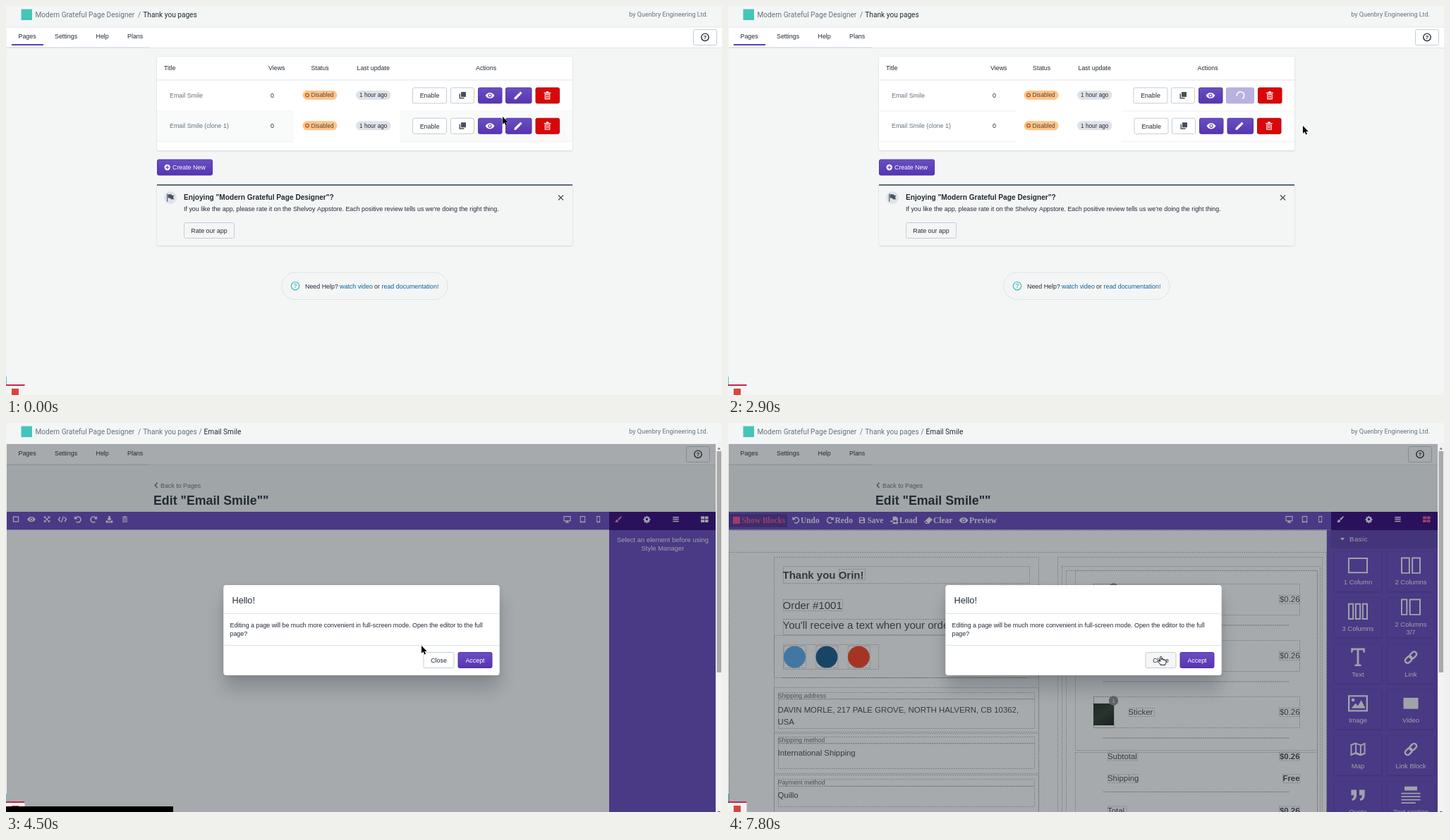
An HTML page with a canvas that plays this animation: 1015x552 px, repeating every 8 s.

```html
<!DOCTYPE html>
<html lang="en">
<head>
<meta charset="utf-8">
<title>Page editor</title>
<style>
html, body { margin: 0; width: 100%; height: 100%; overflow: hidden; background: #f4f6f6; }
canvas { display: block; }
</style>
</head>
<body>
<canvas id="c" width="1015" height="552"></canvas>
<script>
const g = document.getElementById('c').getContext('2d');
const SANS = '"Liberation Sans", Arial, sans-serif';
const ROBOTO = 'Roboto, sans-serif';
const SERIF = '"Liberation Serif", serif';
const APP = 'Modern Grateful Page Designer';
const INK = '#212b36', GREY = '#637381', LINE = '#dfe3e8', BG = '#f4f6f6';
const VIOLET = '#6542bb', DARK = '#300078', PINK = '#ec4a90', PALE = '#f4f2fa';

const ICON = {
  eye: 'M12 5C7 5 3 8 1 12c2 4 6 7 11 7s9-3 11-7c-2-4-6-7-11-7zm0 11.5a4.5 4.5 0 1 1 0-9 4.5 4.5 0 0 1 0 9zm0-2a2.5 2.5 0 1 0 0-5 2.5 2.5 0 0 0 0 5z',
  pencil: 'M3 17v4h4L18 10l-4-4zM20.7 7.3l-2.3 2.3-4-4 2.3-2.3a1 1 0 0 1 1.4 0l2.6 2.6a1 1 0 0 1 0 1.4z',
  trash: 'M5 8h14v14H5zM7 10v10h10V10zM3 4h18v2.4H3zM9 1h6v3H9zM9 11.5h2v7H9zM13 11.5h2v7h-2z',
  copy: 'M8 2h14v14H8zM3 7h3v11h11v3H3z',
  flag: 'M3 2h2v20H3zM6 3h9l1 3h6l-3 5 3 5h-9l-1-3H6z',
  gear: 'M10 1h4l.6 3 2 .9 2.6-1.7 2.7 2.7-1.7 2.6.9 2 3 .5v4l-3 .6-.9 2 1.7 2.6-2.7 2.7-2.6-1.7-2 .9-.6 3h-4l-.6-3-2-.9-2.6 1.7-2.7-2.7 1.7-2.6-.9-2-3-.6v-4l3-.5.9-2-1.7-2.6 2.7-2.7L7.4 4.900l2-.9zM12 8a4 4 0 1 0 0 8 4 4 0 0 0 0-8z',
  bars: 'M2 3h20v3.5H2zM2 10h20v3.5H2zM2 17h20v3.5H2z',
  grid: 'M1 3h10.5v8H1zM13 3h10v8H13zM1 13h10.5v8H1zM13 13h10v8H13z',
  brush: 'M22 2c1.5 1 .5 3-1 5l-7 8-4-4 8-7c2-1.5 3-3 4-2zM8.5 12.5l4 4C12 21 7 23 1 21c3-1 2-8 7.5-8.5z',
  square: 'M2 2h20v20H2zM5 5v14h14V5z',
  full: 'M2 2h20v20H2z',
  expand: 'M2 2h8L7 5l5 5 5-5-3-3h8v8l-3-3-5 5 5 5 3-3v8h-8l3-3-5-5-5 5 3 3H2v-8l3 3 5-5-5-5-3 3z',
  down: 'M9 1h6v8h5l-8 8-8-8h5zM1 16h5l6 5 6-5h5v7H1z',
  desktop: 'M1 2h22v16h-8v3h3v2H6v-2h3v-3H1zM3.5 4.5v11h17v-11z',
  tablet: 'M3 1h18v22H3zM5.5 3.5V19h13V3.5zM11 20h2v2h-2z',
  mobile: 'M6 1h12v22H6zM8 4v15h8V4zM11 20h2v2h-2z',
  save: 'M2 2h16l4 4v16H2zM5 4v6h11V4zM6 14v6h12v-6z',
  load: 'M8 1h10l5 5v17H8v-6h7v3l6-5-6-5v3H8zM1 13h7v4H1z',
  clear: 'M14 3l9 7-10 11H6l-5-5zM6 14l-2.5 2.5L7 19h4z',
  text: 'M3 0h18v6h-1.500L18 2.500H13.300v18.500l3 .6V23.500H7.700v-1.900l3-.6V2.500H6L4.500 6H3z',
  image: 'M0 2h24v20H0zM2 4v16h20V4zM4 18l5-6 3 3 4-7 5 10zM6 6a2 2 0 1 0 .1 0z',
  map: 'M1 5l7-3 8 3 7-3v17l-7 3-8-3-7 3zM3 6.5v12l5-2v-12zM10 4.5v12l5 2v-12zM17 7v12l4-2V5z',
  quote: 'M2 4h8v8c0 5-3 8-7 8v-3c2 0 3-2 3-5H2zM14 4h8v8c0 5-3 8-7 8v-3c2 0 3-2 3-5h-4z',
  col1: 'M0 2.500h24v19H0zM1.700 4.200v15.600h20.600V4.200z',
  col2: 'M0 2h11v20H0zM1.700 3.700v16.600h7.600V3.700zM13 2h11v20H13zM14.700 3.700v16.600h7.600V3.700z',
  col3: 'M0 2h7v20H0zM1.700 3.700v16.600h3.600V3.700zM8.500 2h7v20h-7zM10.200 3.700v16.600h3.600V3.700zM17 2h7v20h-7zM18.700 3.700v16.600h3.600V3.700z',
  col37: 'M0 2h8v20H0zM1.700 3.700v16.600h4.600V3.700zM10 2h14v20H10zM11.700 3.700v16.600h10.600V3.700z',
  lines: 'M4 1h16v5H4zM0 9h24v1.500H0zM0 13h24v1.500H0zM0 17h24v1.500H0zM0 21h18v1.500H0z',
  video: 'M0 3h24v18H0z'
};
for (const k in ICON) ICON[k] = new Path2D(ICON[k]);

function rect(x, y, w, h, c) { g.fillStyle = c; g.fillRect(x, y, w, h); }
function text(s, x, y, size, c, { font = SANS, bold = '', align = 'left' } = {}) {
  g.font = `${bold} ${size}px ${font}`;
  g.textAlign = align;
  g.fillStyle = c;
  g.fillText(s, x, y);
}
function round(x, y, w, h, r, fill, edge, width = 1) {
  g.beginPath();
  g.roundRect(x, y, w, h, r);
  if (fill) { g.fillStyle = fill; g.fill(); }
  if (edge) { g.strokeStyle = edge; g.lineWidth = width; g.stroke(); }
}
function disc(x, y, r, c) { g.beginPath(); g.arc(x, y, r, 0, 7); g.fillStyle = c; g.fill(); }
function ring(x, y, r, c, w) {
  g.beginPath(); g.arc(x, y, r, 0, 7);
  g.strokeStyle = c; g.lineWidth = w; g.stroke();
}
function stroke(points, c, w) {
  g.beginPath();
  points.forEach(([x, y]) => g.lineTo(x, y));
  g.strokeStyle = c; g.lineWidth = w; g.stroke();
}
function icon(name, x, y, size, c) {
  g.save();
  g.translate(x - size / 2, y - size / 2);
  g.scale(size / 24, size / 24);
  g.fillStyle = c;
  g.fill(ICON[name], 'evenodd');
  g.restore();
}
function shadowed(blur, dy, shade, paint) {
  g.save();
  g.shadowColor = shade; g.shadowBlur = blur; g.shadowOffsetY = dy;
  paint();
  g.restore();
}
function card(x, y, w, h, fill, r = 2) {
  shadowed(2, .6, 'rgba(63,63,68,.28)', () => round(x, y, w, h, r, fill));
}
function button(x, y, w, h, label, kind) {
  let fill = kind || '#fff', edge = '#c4cdd5', ink = INK;
  if (kind === 'primary') {
    fill = g.createLinearGradient(0, y, 0, y + h);
    fill.addColorStop(0, '#6950c4'); fill.addColorStop(1, '#5733b0');
    edge = '#5433a8'; ink = '#fff';
  } else if (kind === 'danger') { fill = '#d90808'; edge = '#bf0711'; }
  else if (kind === 'busy') { fill = '#b9b2e0'; edge = '#b3abdc'; }
  round(x + .5, y + .5, w - 1, h - 1, 2, fill, edge);
  if (label) text(label, x + w / 2, y + h / 2 + 3.2, 8.88, ink, { align: 'center' });
}
function closeX(x, y) {
  stroke([[x - 3.5, y - 3.5], [x + 3.5, y + 3.5]], '#45505c', 1.2);
  stroke([[x + 3.5, y - 3.5], [x - 3.5, y + 3.5]], '#45505c', 1.2);
}

function header(edit) {
  const o = { font: ROBOTO };
  rect(0, 0, 1015, 30, BG);
  rect(21.5, 4.5, 15.5, 15.5, '#45c5b8');
  text(APP, 41.5, 15.5, 10.15, GREY, o);
  text('/', 187, 15.5, 10.15, GREY, o);
  text('Thank you pages', 194.3, 15.5, 10.15, edit ? GREY : INK, o);
  if (edit) {
    text('/', 273.5, 15.5, 10.15, GREY, o);
    text('Email Smile', 280.5, 15.5, 10.15, INK, o);
  }
  text('by Quenbry Engineering Ltd.', 995, 15.2, 9, GREY, { font: ROBOTO, align: 'right' });
}
function nav(edit) {
  rect(0, 29.5, 1015, 1, LINE);
  rect(0, 30.5, 1015, 28.5, '#fff');
  rect(0, 59, 1015, 1, LINE);
  rect(0, 58, 204, 1, '#e3e2f6');
  [['Pages', 17.5], ['Settings', 69], ['Help', 127.5], ['Plans', 172]].forEach(([s, x]) => text(s, x, 45.5, 8.88, INK));
  if (!edit) rect(8, 54, 45, 2, '#5c3dbb');
  const x = edit ? 964 : 974;
  button(x, 33, 34, 23);
  ring(x + 17, 44.3, 5.2, INK, 1.4);
  text('?', x + 17, 47.3, 8, INK, { bold: 'bold', align: 'center' });
}
function banner(dx, dy) {
  g.save();
  g.translate(dx, dy);
  card(214, 253, 589, 87, '#f4f6f6');
  rect(214, 253, 589, 2, '#5d6b80');
  disc(233, 272, 9, LINE);
  icon('flag', 233, 272, 13, '#45505f');
  text(`Enjoying "${APP}"?`, 252, 275.3, 10.15, INK, { bold: 'bold' });
  text("If you like the app, please rate it on the Shelvoy Appstore. Each positive review tells us we're doing the right thing.", 252, 291.4, 8.88, INK);
  button(252, 307, 72, 23, 'Rate our app', BG);
  closeX(786.5, 272);
  g.restore();
}

function tableRow(y, name, busy, hover, t) {
  const s = busy ? 1 : 0, cy = y + 22;
  if (hover) { rect(214, y + .5, 194, 43, '#f9fafa'); rect(558, y + .5, 245, 43, '#f9fafa'); }
  rect(214, y + 43.5, 194, 1, '#eef0f1');
  rect(558, y + 43.5, 245, 1, '#eef0f1');
  text(name, 232, cy + 3, 8.88, GREY);
  text('0', 375, cy + 3, 8.88, INK);
  round(420.5 - s, cy - 7, 49, 13, 6.5, '#ffc58b');
  ring(427 - s, cy - .5, 2.4, '#c0501a', 1.3);
  text('Disabled', 432.5 - s, cy + 2.4, 8.25, '#594430');
  round(496 - s, cy - 7, 49.5, 13, 6.5, LINE);
  text('1 hour ago', 501 - s, cy + 2.4, 8.25, INK);

  const load = busy && y < 120, k = load ? 2 : s, top = cy - 11.5;
  button(576 - (load ? 1.5 : s * .5), top, 49, 23, 'Enable');
  button(630 - k, top, 34, 23);
  icon('copy', 647 - k, cy, 12, '#45505c');
  button(669 - k, top, 34.5, 23, '', 'primary');
  icon('eye', 686 - k, cy, 14, '#fff');
  if (load) {
    button(706, top, 40, 23, '', 'busy');
    const a = (t - 1500) / 500 * Math.PI * 2 + 4.35;
    g.beginPath();
    g.arc(726.5, cy, 5.2, a, a + 4.1);
    g.strokeStyle = '#fff'; g.lineWidth = 1.5; g.lineCap = 'round'; g.stroke(); g.lineCap = 'butt';
  } else {
    button(708 - s * .5, top, 37.5, 23, '', 'primary');
    icon('pencil', 726 - s, cy, 14.5, '#fff');
  }
  const tx = load ? 751 : 750.5 - s * .5;
  button(tx, top, 34.5, 23, '', 'danger');
  icon('trash', tx + 17, cy, 13, '#fff');
}
function listPage(t, cx, cy) {
  const busy = t >= 500, s = busy ? 1 : 0, over = cx < 803;
  rect(0, 30, 1015, 522, BG);
  nav(false);
  card(214, 72, 589, 133, '#fff');
  [['Title', 224], ['Views', 372], ['Status', 432.5 - s * .5], ['Last update', 497.5 - s], ['Actions', 666 - s * .5]]
    .forEach(([l, x]) => text(l, x, 91.3, 8.88, INK));
  rect(214, 104.5, 589, 1, LINE);
  tableRow(105, 'Email Smile', busy, over && cy > 105 && cy < 149, t);
  tableRow(148.3, 'Email Smile (clone 1)', busy, over && cy >= 149 && cy < 192, t);
  button(214, 217.5, 79, 23, '', 'primary');
  disc(228.7, 229, 4.2, '#fff');
  rect(226.2, 228.4, 5, 1.2, '#5c3dbb'); rect(228.1, 226.5, 1.2, 5, '#5c3dbb');
  text('Create New', 236, 232.2, 8.88, '#fff');
  banner(0, 0);
  round(391, 378, 235, 38.5, 19, '', LINE);
  ring(410, 397.3, 5.7, '#47c1bf', 1.3);
  text('?', 410, 400.4, 8.5, '#47c1bf', { bold: 'bold', align: 'center' });
  text('Need Help?', 424, 400.5, 8.88, INK);
  text('watch video', 473, 400.5, 8.88, '#0f629c');
  text('or', 522, 400.5, 8.88, INK);
  text('read documentation!', 532.5, 400.5, 8.88, '#0f629c');
}

function skeleton() {
  const bar = (x, y, w) => round(x, y - 2.5, w, 5, 2, LINE);
  card(0, 132, 663, 31, '#fff', 0);
  bar(13.5, 147.5, 637);
  card(0, 176, 663, 257, '#fff', 0);
  for (let i = 0; i < 19; i++) bar(13.5, 190.3 + i * 12.63, i < 18 ? 637 : 509);
  card(675, 132, 331, 306, '#fff', 0);
  for (let i = 0; i < 3; i++) {
    const y = 132 + i * 102;
    if (i) rect(675, y, 331, 1, LINE);
    round(688, y + 13, 76, 17.5, 2, LINE);
    bar(688, y + 43.3, 306); bar(688, y + 56, 244);
    rect(675, y + 72, 331, 1, LINE);
    bar(688, y + 87, 306);
  }
  banner(-5, 198);
}
function turn(x, y, dir, c) {
  g.save();
  g.translate(x, y); g.scale(dir, 1);
  g.beginPath(); g.arc(0, 0, 4, -2.7, 2.2);
  g.strokeStyle = c; g.lineWidth = 1.6; g.stroke();
  g.beginPath(); g.moveTo(-5.2, -5); g.lineTo(-5.2, -.5); g.lineTo(-.7, -.5);
  g.fillStyle = c; g.fill();
  g.restore();
}
function panels(loaded, active) {
  const cy = 136.7;
  rect(0, 126, 855, 25.5, VIOLET);
  rect(855, 126, 151, 426, VIOLET);
  rect(855, 126, 151, 26, DARK);
  if (loaded) {
    if (active) rect(1.5, 129, 82.5, 19, '#4e2f92');
    const hot = active ? PINK : PALE, o = { font: SERIF, bold: 'bold' };
    icon('full', 12, 138, 12, hot);
    text('Show Blocks', 19.5, 142, 11.42, hot, o);
    turn(96.5, 138, 1, PALE); turn(144.5, 138, -1, PALE);
    icon('save', 190, 138, 10, PALE); icon('load', 235.5, 138, 11.5, PALE);
    icon('clear', 284, 138, 13, PALE); icon('eye', 334, 138, 14, PALE);
    [['Undo', 103], ['Redo', 151.5], ['Save', 197.5], ['Load', 243], ['Clear', 291], ['Preview', 342]]
      .forEach(([s, x]) => text(s, x, 142, 11.42, PALE, o));
  } else {
    icon('square', 14, cy, 10, PALE); icon('eye', 36, cy, 12.5, PALE); icon('expand', 58, cy, 10, PALE);
    stroke([[77, 133.5], [74.5, cy], [77, 140]], PALE, 1.5);
    stroke([[83, 133.5], [85.5, cy], [83, 140]], PALE, 1.5);
    stroke([[81.3, 132.5], [78.7, 141]], PALE, 1.3);
    turn(102, 137, 1, PALE); turn(124, 137, -1, PALE);
    icon('down', 146.5, cy, 10.5, PALE); icon('trash', 168.5, cy, 10.5, PALE);
  }
  icon('desktop', 795.5, cy, 11, PALE);
  icon('tablet', 817.5, cy, 10, PALE);
  icon('mobile', 839.7, cy, 10, PALE);
  icon('brush', 868, cy, 10.5, loaded ? PALE : '#f080b0');
  icon('gear', 908.5, cy, 10, PALE);
  icon('bars', 949.5, cy, 10, PALE);
  icon('grid', 990.3, cy, 11.5, active ? PINK : PALE);
  if (loaded) blocks();
  else ['Select an element before using', 'Style Manager'].forEach((s, i) => text(s, 931, 168.5 + i * 12.6, 9.45, PALE, { align: 'center' }));
}
function link(x, y) {
  g.save();
  g.translate(x, y); g.rotate(-.785);
  round(-10, -3.5, 11, 7, 3.5, '', PALE, 2.5);
  round(-1, -3.5, 11, 7, 3.5, '', PALE, 2.5);
  g.restore();
}
function blocks() {
  rect(855, 152, 151, 26, 'rgba(0,0,0,.1)');
  g.beginPath(); g.moveTo(868, 163); g.lineTo(874, 163); g.lineTo(871, 166.5);
  g.fillStyle = PALE; g.fill();
  g.letterSpacing = '.6px';
  text('Basic', 881, 168, 9.45, PALE);
  g.letterSpacing = '0px';
  const items = [['col1', 28, '1 Column'], ['col2', 28, '2 Columns'], ['col3', 28, '3 Columns'], ['col37', 28, '2 Columns', '3/7'],
    ['text', 26, 'Text'], ['', 0, 'Link'], ['image', 28, 'Image'], ['video', 21, 'Video'],
    ['map', 23, 'Map'], ['', 0, 'Link Block'], ['quote', 23, 'Quote'], ['lines', 27, 'Text section']];
  items.forEach(([n, size, a, b], i) => {
    const x = i % 2 ? 968 : 893, y = 184 + (i >> 1) * 65.2, o = { align: 'center' };
    shadowed(3, .6, 'rgba(0,0,0,.25)', () => round(x - 33.5, y - 1, 67, 56, 2, VIOLET));
    const iy = y + (b ? 12 : 18.2);
    if (n) icon(n, x, iy, size, PALE);
    else link(x, iy);
    text(a, x, y + (b ? 40 : 45.3), 9.45, PALE, o);
    if (b) text(b, x, y + 51, 9.45, PALE, o);
  });
}
function emailPage(outlined, photo) {
  const C = '#3f4347', dash = (x, y, w, h) => {
    if (!outlined) return;
    g.setLineDash([1.9, 1.3]);
    g.strokeStyle = 'rgba(140,140,140,.9)'; g.lineWidth = .65;
    g.strokeRect(x + .5, y + .5, w, h);
    g.setLineDash([]);
  };
  const rule = (x, y, w) => { g.setLineDash([2, 1]); stroke([[x, y + .5], [x + w, y + .5]], '#858585', .8); g.setLineDash([]); };
  const price = (s, y, bold) => {
    text(s, 810.5, y, 11.4, C, { align: 'right', bold });
    const w = s === 'Free' ? 24 : 29;
    dash(810 - w, y - 10, w, 12);
  };
  g.save();
  g.beginPath(); g.rect(0, 151.5, 850, 401); g.clip();
  dash(1, 152, 847, 420); dash(1, 183, 847, 400);
  dash(65, 190, 375, 400); dash(467, 190, 375, 400);
  dash(78, 203, 349, 24); dash(157, 207, 37, 15);
  text('Thank you Orin!', 77.5, 220.7, 15, C, { bold: 'bold' });
  text('Order #1001', 77.5, 263.7, 15, C);
  dash(78, 250, 84, 16);
  text("You'll receive a text when your order ships", 77.5, 292, 15, C);
  dash(78, 278, 349, 22); dash(65, 301, 375, 60);
  dash(78, 314, 135, 35);
  ['#55acee', '#125688', '#ff3b1a'].forEach((c, i) => {
    disc(94.5 + i * 45.4, 332, 15.5, c);
    dash(79 + i * 45.4, 316, 31, 31);
  });
  rule(78, 361, 346);
  dash(65, 375, 375, 63); dash(65, 440, 375, 57); dash(65, 499, 375, 70);
  [['Shipping address', 390], ['Shipping method', 453], ['Payment method', 513.2]].forEach(([s, y]) => {
    text(s, 70.5, y, 8.88, '#666');
    dash(71, y - 8, 363, 9.5);
  });
  dash(71, 391, 363, 42); dash(71, 454, 363, 36); dash(71, 515, 363, 29);
  ['DAVIN MORLE, 217 PALE GROVE, NORTH HALVERN, CB 10362,', 'USA'].forEach((s, i) => text(s, 70.5, 410.5 + i * 17, 11.4, C));
  text('International Shipping', 70.5, 472, 11.4, C);
  text('Quillo', 70.5, 532, 11.4, C);

  dash(473, 203, 366, 400); dash(479, 209, 356, 400); dash(492, 209, 343, 255);
  for (let i = 0; i < 3; i++) {
    const y = 228 + i * 80;
    dash(518, y, 292, 44);
    dash(518, y, 29, 44);
    if (photo) {
      const p = g.createLinearGradient(518, y, 547, y + 42);
      p.addColorStop(0, '#101c18'); p.addColorStop(.55, '#2c3c26'); p.addColorStop(1, '#111914');
      rect(518, y + 10, 29, 31, p);
    }
    disc(546.5, y + 6, 6.7, '#8a8a8a');
    text('1', 546.5, y + 8.7, 7.5, '#fff', { align: 'center' });
    text('Sticker', 567.5, y + 26, 11.4, C);
    dash(568, y + 16, 36, 12);
    price('$0.26', y + 26);
    rule(532, y + 58.5, 264);
  }
  dash(492, 467, 343, 130);
  [['Subtotal', '$0.26', 476.5], ['Shipping', 'Free', 508.2], ['Total', '$0.26', 553.5]].forEach(([s, v, y]) => {
    text(s, 538, y, 11.4, C);
    dash(538, y - 10, s.length * 5.3, 12);
    price(v, y, 'bold');
  });
  rule(532, 523, 264);
  g.restore();
  rect(849, 151.5, 6, 401, VIOLET);
}
function modal(hover) {
  const box = () => round(308.5, 230, 391, 128, 4, '#fff');
  shadowed(26, 19.5, 'rgba(32,42,53,.25)', box);
  shadowed(10, 1.3, 'rgba(32,42,54,.12)', box);
  text('Hello!', 320.5, 255.7, 12.7, INK);
  rect(308.5, 270, 391, 1, LINE); rect(308.5, 315, 391, 1, LINE);
  text('Editing a page will be much more convenient in full-screen mode. Open the editor to the full', 317.5, 289.7, 8.88, INK);
  text('page?', 317.5, 302.3, 8.88, INK);
  button(591.5, 325, 44, 23, 'Close', hover ? '#f4f6f8' : '#fff');
  button(640.5, 325, 49, 23, 'Accept', 'primary');
}
function editPage(t) {
  const editor = t >= 4100, loaded = t >= 5000, outlined = t >= 5300;
  rect(0, 30, 1015, 522, BG);
  nav(true);
  stroke([[214.5, 84.7], [211.3, 88.4], [214.5, 92]], GREY, 1.5);
  text('Back to Pages', 219, 91.5, 8.88, GREY);
  text('Edit "Email Smile""', 209, 115.7, 17.77, INK, { bold: 'bold' });
  if (editor) {
    rect(0, 151, 855, 401, '#fff');
    panels(loaded, outlined);
    if (loaded) emailPage(outlined, t >= 6600);
  } else skeleton();

  const fade = t >= 3100 ? 1 : .4;
  rect(1, 30, 1005, 522, `rgba(33,44,52,${.4 * fade})`);
  rect(1006, 30, 9, 522, '#f3f3f3');
  rect(1007.5, 40, 6.5, editor ? 314 : 449, '#a9a9a9');
  g.fillStyle = '#777';
  g.beginPath(); g.moveTo(1008.5, 37.5); g.lineTo(1013, 37.5); g.lineTo(1010.7, 34.5); g.fill();
  rect(1009, 551, 3.5, 1, '#555');
  g.globalAlpha = fade;
  modal(t >= 7700);
  g.globalAlpha = 1;
}

const PATH = [[0, 704, 157], [300, 724, 128], [400, 724, 128], [1300, 815, 170], [4000, 815, 170],
  [4500, 589, 316], [4700, 552, 330], [5200, 552, 330], [6100, 22, 91.5], [6300, 22, 91.5],
  [6550, 140, 55], [6900, 478, 85], [7000, 478, 85], [7400, 612, 300], [7500, 612, 300], [7800, 613.5, 331.5]];
function cursorAt(t) {
  let i = 0;
  while (i < PATH.length - 2 && t > PATH[i + 1][0]) i++;
  const [t0, x0, y0] = PATH[i], [t1, x1, y1] = PATH[i + 1];
  const k = Math.min(1, (t - t0) / (t1 - t0));
  return [x0 + (x1 - x0) * k, y0 + (y1 - y0) * k];
}
const ARROW = new Path2D('M0 0V10.8L2.5 8.6 4.300 12.5 6 11.8 4.300 7.900H7.700Z');
const HAND = new Path2D('M-1 1C-1-.6 1.300-.6 1.300 1V4.500C2-.1 3.500 4 3.600 5 4.300 4 5.500 4.500 5.600 5.500 6.500 4.800 7.600 5.300 7.600 6.500 7.600 9 6.500 9.500 6.300 11.800H-.5C-1 9.800-3 8.500-4.300 6.800-4.600 5.500-3 5-1 7.200Z');
function pointer(x, y, hand) {
  g.save();
  g.translate(x, y);
  g.lineWidth = hand ? 1 : .8; g.lineJoin = 'round';
  g.strokeStyle = hand ? '#111' : 'rgba(255,255,255,.6)';
  g.fillStyle = hand ? '#fff' : '#000';
  const p = hand ? HAND : ARROW;
  if (hand) { g.fill(p); g.stroke(p); } else { g.stroke(p); g.fill(p); }
  g.restore();
}

function draw(now) {
  const t = Math.floor(now % 8000 / 100) * 100;
  const [x, y] = cursorAt(t), edit = t >= 3000;
  header(edit);
  if (edit) editPage(t); else listPage(t, x, y);
  rect(0, 30, 1, 522, '#eef2f3');
  rect(0, 526, 1, 11, '#58c3cf');
  rect(0, 537, 26.5, 15, '#f3f3f1');
  rect(0, 537, 26.5, 2, '#c22550');
  rect(8, 543, 10, 9, '#d8453f');
  if (t >= 700 && t < 1400 || t >= 4200 && t < 5000) rect(0, 544, 237, 8, '#000');
  pointer(x, y, t >= 200 && t < 500 || t >= 7700);
  requestAnimationFrame(draw);
}
requestAnimationFrame(draw);
</script>
</body>
</html>
```
